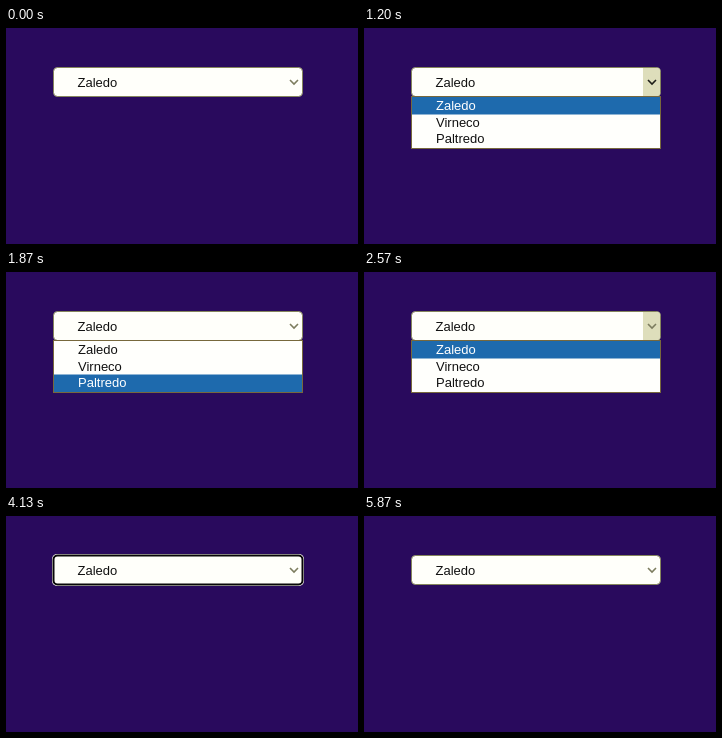
An HTML page for the animation above (7.03 s loop, 352x216 px).

```html
<!DOCTYPE html>
<html lang="pt">
<head>
<meta charset="utf-8">
<title>Select</title>
<style>
  html, body { margin: 0; width: 100%; height: 100%; overflow: hidden; background: #290a5d; }
  svg { display: block; width: 352px; height: 216px; }
  text { font: 13px "Liberation Sans", Arial, sans-serif; fill: #111; }
</style>
</head>
<body>
<svg viewBox="0 0 352 216">
  <rect id="ring" x="46" y="38" width="252" height="32" rx="5" fill="#fffff0"/>
  <rect id="field" x="47.5" y="39.5" width="249" height="29" rx="4" fill="#fffffa"/>
  <path id="button" d="M279 40h14q3 0 3 3v22q0 3 -3 3h-14z" fill="#dedebb"/>
  <path id="arrow" d="M284 52l4 4 4-4" fill="none" stroke-width="1.6"/>
  <text id="value" x="71.5" y="59"></text>
  <g id="list">
    <rect x="47.5" y="68.5" width="249" height="52" fill="#fffffc" stroke="#77683c"/>
    <rect id="highlight" x="48" width="248" height="17.5" fill="#1e6aad"/>
  </g>
</svg>
<script>
const LOOP = 7030;
const names = ["Zaledo", "Virneco", "Paltredo"];
const $ = id => document.getElementById(id);

const options = names.map((name, i) => {
  const text = document.createElementNS("http://www.w3.org/2000/svg", "text");
  text.setAttribute("x", 72);
  text.setAttribute("y", [82, 99, 115][i]);
  text.textContent = name;
  $("list").append(text);
  return text;
});
$("value").textContent = names[0];

// Each entry is [time, highlighted row].
const selection = [[0, 0], [1700, 1], [1800, 2], [2430, 1], [2500, 0], [2830, 1], [3100, 0]];

const ramp = (t, start, end) => Math.min(1, Math.max(0, (t - start) / (end - start)));
const pulse = (t, a, b, c, d) => ramp(t, a, b) - ramp(t, c, d);
const mix = (from, to, k) => `rgb(${from.map((v, i) => Math.round(v + (to[i] - v) * k))})`;
const show = (id, visible) => $(id).setAttribute("visibility", visible ? "visible" : "hidden");

function render(t) {
  const focused = t >= 3430 && t < 5800;
  show("ring", focused);
  $("field").setAttribute("stroke", focused ? "#080808" : "#85855c");
  $("field").setAttribute("stroke-width", focused ? 2 : 1);

  const hover = pulse(t, 70, 170, 1630, 1770) + pulse(t, 2450, 2570, 4030, 4130);
  const dark = pulse(t, 70, 170, 1200, 1400) + pulse(t, 3430, 3570, 4030, 4130);
  $("button").setAttribute("opacity", hover);
  $("arrow").setAttribute("stroke", mix([125, 125, 95], [30, 30, 24], dark));

  show("list", t >= 1200 && t < 3430);
  const row = selection.findLast(([time]) => t >= time)[1];
  $("highlight").setAttribute("y", [69, 86, 102.5][row]);
  options.forEach((text, i) => text.style.fill = i === row ? "#fff" : "#111");
}

function frame(now) {
  render(now % LOOP);
  requestAnimationFrame(frame);
}
render(0);
requestAnimationFrame(frame);
</script>
</body>
</html>
```
